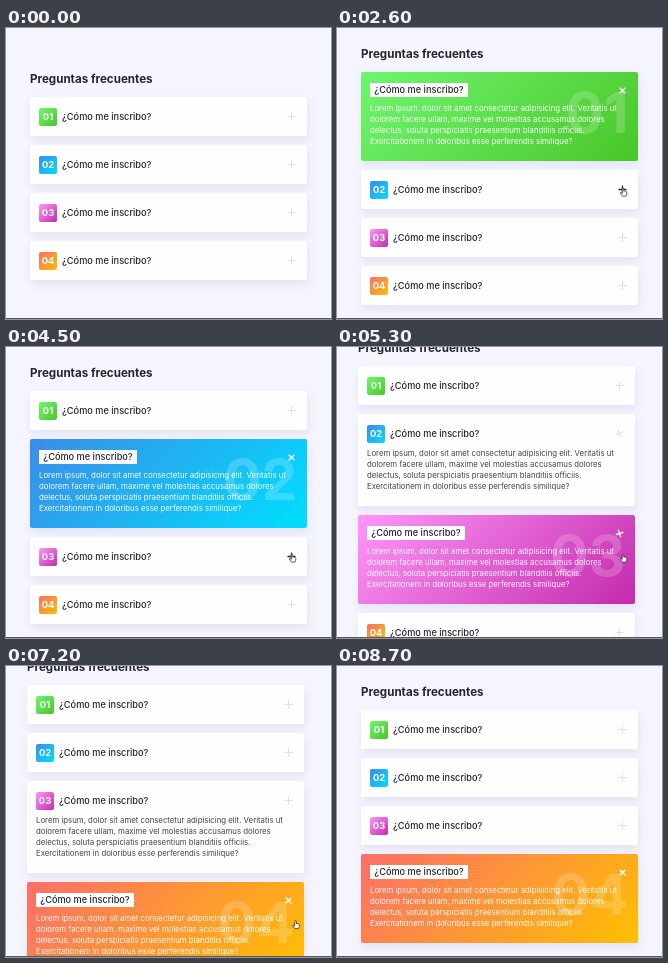
An HTML page that plays this animation: 325x291 px, repeating every 9.7 s.

```html
<!DOCTYPE html>
<html lang="es">
<head>
<meta charset="utf-8">
<title>Preguntas frecuentes</title>
<style>
  html, body { margin: 0; width: 100%; height: 100%; overflow: hidden; background: #f5f5ff; }
  body { position: relative; font-family: Poppins, Inter, sans-serif; color: #26252d; }
  #stage { position: absolute; left: 0; top: 0; width: 325px; height: 291px; overflow: hidden; }
  #stage::after { content: ""; position: absolute; left: 0; bottom: 0; width: 100%; height: 1px; background: #55555c; }
  #page, #page > *, .card > *, #cursor { position: absolute; left: 0; top: 0; }
  h1 { margin: 0; font: 700 11.6px/16px Poppins, Inter, sans-serif; white-space: nowrap; }
  .card { width: 276.5px; border-radius: 2px; background: #fefeff; box-shadow: 1px 4px 8px rgba(70, 70, 130, .1); overflow: hidden; white-space: nowrap; }
  .card.open { background: var(--fill); }
  .card .num { left: 9px; top: 10.5px; width: 18px; height: 18px; border-radius: 2px; background: var(--fill);
    color: #fff; font-weight: 700; font-size: 9.3px; line-height: 18px; text-align: center; }
  .card.open .num { left: auto; right: 9px; top: 11px; width: auto; height: 60px; background: none;
    color: rgba(255, 255, 255, .19); font-size: 57px; line-height: 60px; }
  .card .ask { left: 32px; top: 12.5px; font-weight: 500; font-size: 9.2px; line-height: 14px; }
  .card.open .ask { left: 9px; top: 11px; width: 98px; background: #fff; text-align: center; }
  .card .body { left: 9px; width: 262px; overflow: hidden; }
  .card p { margin: 0; padding-top: 5.5px; font-size: 7.8px; line-height: 11.1px; color: #45444e; }
  .card.open p { color: rgba(255, 255, 255, .95); }
  .card .icon { left: 257.3px; width: 9px; height: 9px; stroke: #dfdfe8; stroke-width: 1; }
  .card.hover .icon { stroke: #2b2b33; stroke-width: 1.3; }
  .card.open .icon { stroke: #fff; stroke-width: 1.4; }
  #cursor { width: 12px; height: 14px; overflow: visible; }
  #cursor path { fill: #fff; stroke: #1b1b1f; stroke-width: .9; stroke-linejoin: round; transform: scale(.75); }
</style>
</head>
<body>
<div id="stage">
  <div id="page"><h1>Preguntas frecuentes</h1></div>
  <svg id="cursor" viewBox="0 0 12 14"><path></path></svg>
</div>
<script>
const LOOP = 9700;
const CLICKS = [1290, 2880, 4990, 6980];
const FILLS = ['#70f570, #49c628', '#3c8ce7, #00deff', '#ff96f9, #c32bac', '#fd6e6a, #ffc000'];
const ANSWER = [
  'Lorem ipsum, dolor sit amet consectetur adipisicing elit. Veritatis ut',
  'dolorem facere ullam, maxime vel molestias accusamus dolores',
  'delectus, soluta perspiciatis praesentium blanditiis officiis.',
  'Exercitationem in doloribus esse perferendis similique?'
].join('<br>');
const PAD = 10.25, GAP = 9.5, FULL = 53, MAX = 400;
const OPEN_HEAD = 15, SHUT_HEAD = 18;

// Pointer moves: start, end, from x, y, to x, y, sideways bow
const MOVES = [
  [100, 800, 46, 181, 286, 88, 0],
  [2250, 2580, 286, 88, 286, 160, 3],
  [4100, 4480, 286, 160, 286, 207, 3],
  [6350, 6680, 286, 207, 289.5, 254.5, 8],
  [8350, 8700, 289.5, 254.5, 304, 278, 0]
];
const HAND = 'M-1 .6Q0-.6 1 .6V4.2L2 3.9 3.2 4.3 4.3 4.6 5 5.4V8.2L4 10.8H-.8L-3.6 7Q-3.6 5.6-2.3 6.2L-1 7.4Z';
const ARROW = 'M0 0V6.6L1.6 5.2 2.6 7.4 3.6 7 2.6 4.8H4.7Z';

const page = document.getElementById('page');
const title = page.querySelector('h1');
const cursor = document.getElementById('cursor');
const shape = cursor.querySelector('path');

const cards = FILLS.map((fill, i) => {
  const el = document.createElement('div');
  el.className = 'card';
  el.style.setProperty('--fill', `linear-gradient(135deg, ${fill})`);
  el.innerHTML = `<div class="num">0${i + 1}</div><div class="ask">¿Cómo me inscribo?</div>
    <div class="body"><p>${ANSWER}</p></div>
    <svg class="icon" viewBox="0 0 9 9"><path d="M4.5 .5V8.5M.5 4.5H8.5"/></svg>`;
  page.append(el);
  return { el, body: el.querySelector('.body'), icon: el.querySelector('.icon') };
});

const clamp = v => Math.min(1, Math.max(0, v));
const smooth = v => v * v * (3 - 2 * v);
const place = (el, x, y) => { el.style.transform = `translate(${x}px, ${y}px)`; };

// The CSS "ease" curve
function ease(x) {
  if (x <= 0) return 0;
  if (x >= 1) return 1;
  let lo = 0, hi = 1, s = .5;
  for (let k = 0; k < 22; k++) {
    s = (lo + hi) / 2;
    if (.75 * s * (1 - s) + s ** 3 < x) lo = s; else hi = s;
  }
  return .3 * s * (1 - s) ** 2 + 3 * s * s * (1 - s) + s ** 3;
}

function pointer(t) {
  if (t < MOVES[0][0] || t >= 8700) return null;
  const [a, b, x0, y0, x1, y1, bow] = MOVES.filter(m => t >= m[0]).pop();
  const k = smooth(clamp((t - a) / (b - a)));
  return { x: x0 + (x1 - x0) * k + bow * Math.sin(Math.PI * k), y: y0 + (y1 - y0) * k };
}

function cardState(i, t) {
  const from = CLICKS[i], to = CLICKS[i + 1] ?? LOOP;
  const open = t >= from && t < to;
  const k = open ? ease((t - from) / 1000) : t >= to ? 1 - ease((t - to) / 1000) : 0;
  const reveal = Math.min(FULL, MAX * k);
  const head = open ? OPEN_HEAD : SHUT_HEAD;
  return { open, k, reveal, head, height: 2 * PAD + head + reveal };
}

function draw(t) {
  const states = cards.map((_, i) => cardState(i, t));
  const extra = states.reduce((sum, s) => sum + s.height - 2 * PAD - SHUT_HEAD, 0);
  const left = extra > 78 ? 21 : 24;
  const mid = Math.max(1, 51 - extra / 2);
  const tip = pointer(t);
  let y = mid + 18, overIcon = false;

  place(title, left, mid - 8);
  cards.forEach(({ el, body, icon }, i) => {
    const s = states[i];
    const iconY = s.open ? 18.3 : 19.5;
    const near = !!tip && Math.hypot(tip.x - left - 262, tip.y - y - iconY) < 7;
    overIcon = overIcon || near;
    el.classList.toggle('open', s.open);
    el.classList.toggle('hover', near && !s.open);
    el.style.height = s.height + 'px';
    place(el, left, y);
    body.style.top = PAD + s.head + 'px';
    body.style.height = s.reveal + 'px';
    icon.style.top = iconY - 4.5 + 'px';
    icon.style.transform = `rotate(${135 * s.k}deg)`;
    y += s.height + GAP;
  });

  cursor.style.display = tip ? 'block' : 'none';
  if (tip) {
    const justClicked = CLICKS.some(c => t >= c && t < c + 850);
    shape.setAttribute('d', overIcon || justClicked ? HAND : ARROW);
    place(cursor, tip.x, tip.y);
  }
}

const start = performance.now();
function tick() {
  draw((performance.now() - start) % LOOP);
  requestAnimationFrame(tick);
}
tick();
</script>
</body>
</html>
```
